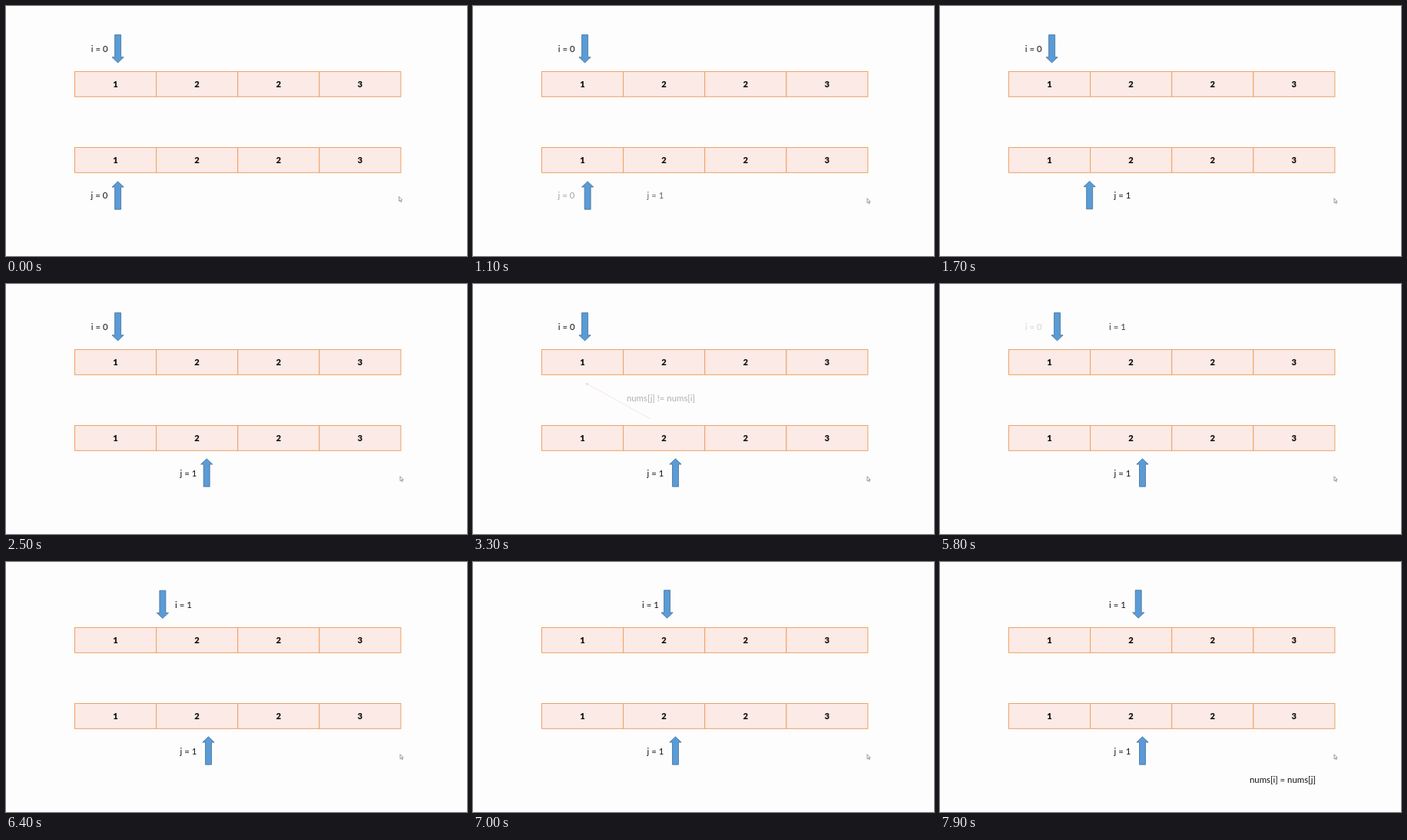
Animation of 600x326 px, one loop 8000 ms. Source, as an HTML page:

```html
<!DOCTYPE html>
<html lang="en">
<head>
<meta charset="utf-8">
<style>
  html, body { margin: 0; width: 100%; height: 100%; overflow: hidden; background: #fdfdfe; }
  svg { display: block; width: 600px; height: 326px; }
  text { font: 11.4px Lato, sans-serif; fill: #111; text-anchor: middle; }
  .cell { fill: #fbeae5; stroke: #eda266; }
  .cell + text { font-weight: 900; font-size: 11.2px; }
  .arrow { fill: #5b9bd5; stroke: #41719c; stroke-width: .8; }
  .link { stroke: #e79a62; stroke-width: .75; }
  .tip { fill: #e58a48; }
</style>
</head>
<body>
<svg viewBox="0 0 600 326">
  <g id="cells"></g>
  <text id="i0" x="121.7" y="60">i = 0</text>
  <text id="i1" x="231" y="60">i = 1</text>
  <text id="j0" x="121.5" y="251">j = 0</text>
  <text id="j1" x="237.5" y="251">j = 1</text>
  <g id="compare">
    <path class="link" d="M231 176 149 130.5"/>
    <path class="tip" d="M146 129l4.6.4-1.9 3.4z"/>
    <text x="244.5" y="152.5">nums[j] != nums[i]</text>
  </g>
  <text id="assign" x="446" y="287.5">nums[i] = nums[j]</text>
  <path id="iArrow" class="arrow" d="M-4 .4H4V29.5H7.6L0 36.8-7.6 29.5H-4z"/>
  <path id="jArrow" class="arrow" d="M-4 36.4H4V7.3H7.6L0 0-7.6 7.3H-4z"/>
  <path id="cursor" d="M0 0V6L1.4 4.8 2.4 7 3.3 6.6 2.4 4.5H4.2z" fill="#fff" stroke="#777" stroke-width=".7"/>
</svg>
<script>
const LOOP = 8000, MOVE = 1800, FADE = 500;
const $ = id => document.getElementById(id);

let cells = '';
for (const y of [85.5, 184.5])
  [1, 2, 2, 3].forEach((n, k) => {
    const x = 89.5 + k * 106.1;
    cells += `<rect class="cell" x="${x}" y="${y}" width="106.1" height="32.8"/>
      <text x="${x + 53}" y="${y + 20.6}">${n}</text>`;
  });
$('cells').innerHTML = cells;

const ramp = (t, start, length) => Math.min(1, Math.max(0, (t - start) / length));
const ease = u => u < .5 ? 2 * u * u : 1 - 2 * (1 - u) ** 2;
const show = (id, alpha) => $(id).setAttribute('opacity', alpha);
const place = (id, x, y) => $(id).setAttribute('transform', `translate(${x} ${y})`);

function draw(t) {
  const jFade = ramp(t, 790, FADE), iFade = ramp(t, 5390, FADE);
  show('j0', 1 - jFade);
  show('j1', jFade);
  show('i0', 1 - iFade);
  show('i1', iFade);
  show('compare', ramp(t, 3140, FADE) - ramp(t, 4380, FADE));
  show('assign', ramp(t, 7380, FADE));

  const j = ease(ramp(t, 880, MOVE)), i = ease(ramp(t, 5485, MOVE));
  place('jArrow', 145.6 + 117.9 * j, 228.8 - j);
  place('iArrow', 145.6 + 112.6 * i, 37.2 - .8 * i);

  const drift = ramp(t, 0, 300);
  place('cursor', 511.5 + 1.5 * drift, 248.6 + 2.2 * drift);
}

function tick() {
  draw(performance.now() % LOOP);
  requestAnimationFrame(tick);
}
tick();
</script>
</body>
</html>
```
